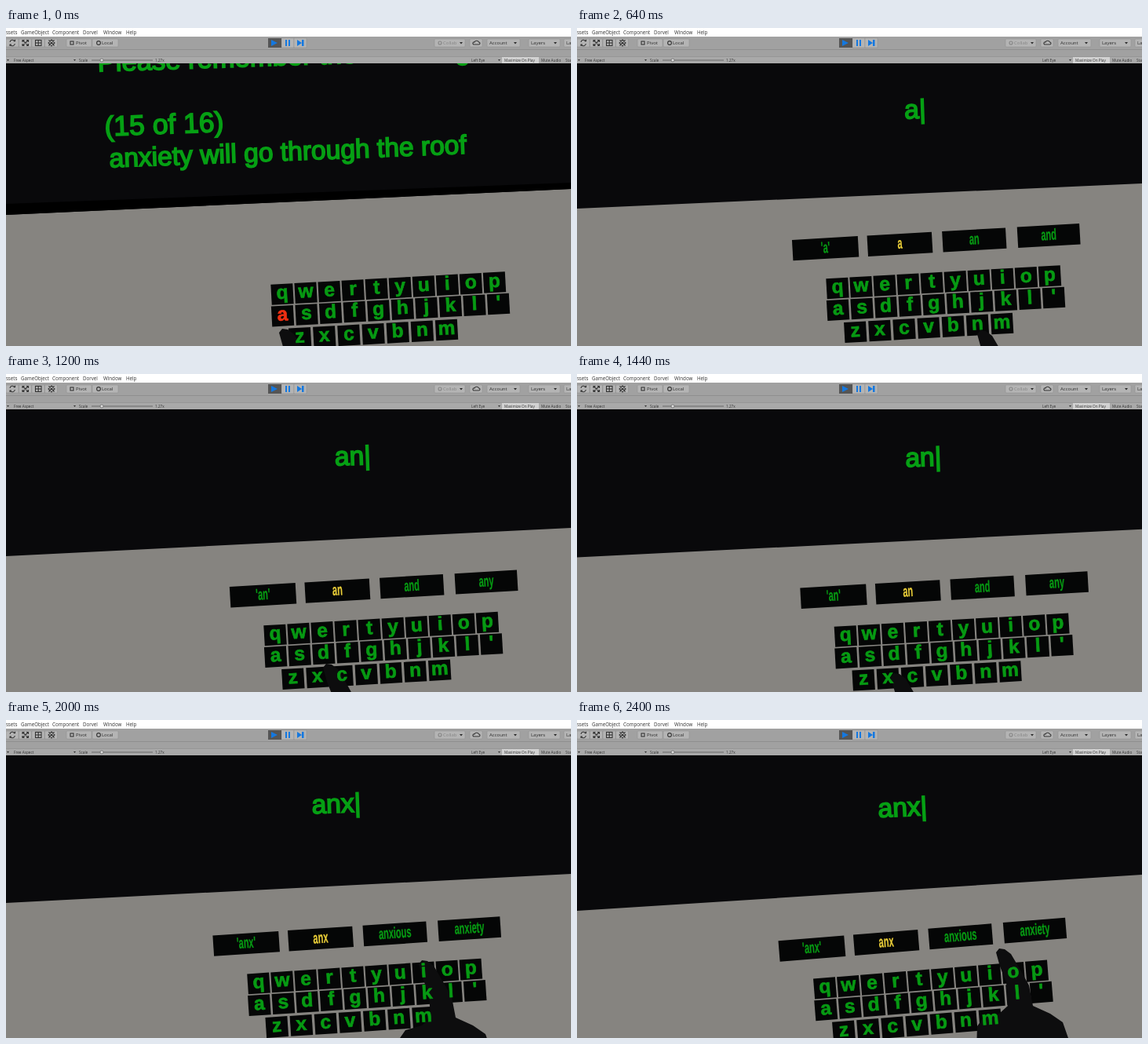
An HTML page for the animation above (2480 ms loop, 720 px wide and 405 px high).

```html
<!DOCTYPE html>
<html lang="en">
<head>
<meta charset="utf-8">
<title>Typing in VR</title>
<style>
html, body { margin: 0; width: 100%; height: 100%; overflow: hidden; background: #000; }
svg { display: block; width: 720px; height: 405px; }
text { white-space: pre; }
#prompt, #typed { font: 33.6px "Liberation Sans", Arial, sans-serif; fill: #06a014; stroke: #06a014; stroke-width: 1.7; }
#typed, .mid { text-anchor: middle; }
#letters text { font: bold 24.5px "Liberation Sans", Arial, sans-serif; fill: #079a13; stroke: #079a13; stroke-width: .7; }
#letters .down { fill: #ee2f12; stroke: #ee2f12; }
#keys rect { fill: #050606; }
#letters .hint { font-size: 20px; stroke-width: .3; }
#letters .pick { fill: #e8cc38; stroke: #e8cc38; }
#menu { font: 6.2px "Open Sans", sans-serif; fill: #333; }
#tools { font: 6px "Open Sans", sans-serif; fill: #2b2b2b; }
#strip { font: 4.7px "Open Sans", sans-serif; fill: #333; }
.btn { fill: #b4b4b4; stroke: #8c8c8c; stroke-width: .5; }
.ico { fill: none; stroke: #333; stroke-width: 1.1; }
.dim { fill: #858585; }
.blue { fill: #1478e0; }
</style>
</head>
<body>
<svg viewBox="0 0 720 405">
  <rect width="720" height="405" fill="#868480"/>
  <polygon id="wall" fill="#09090b"/>
  <polygon id="band" fill="#000"/>
  <g id="prompt">
    <text style="font-size:34.6px" transform="translate(117 55.5) rotate(-1.9)">Please remember the following</text>
    <text style="font-size:35.5px" transform="translate(126 137.500) rotate(-2.2)">(15 of 16)</text>
    <text transform="translate(132 177.500) rotate(-2.2)">anxiety will go through the roof</text>
  </g>
  <text id="typed" y="8"></text>
  <g id="keys"></g>
  <polygon id="hand" fill="#0d0d0e"/>
  <g id="letters"></g>

  <rect width="720" height="11" fill="#fff"/>
  <rect y="11" width="720" height="34" fill="#a1a1a1"/>
  <rect y="27" width="720" height="1" fill="#8f8f8f"/>
  <rect y="36" width="720" height="9" fill="#a9a9a9"/>
  <rect y="36" width="720" height=".7" fill="#8f8f8f"/>
  <g id="menu">
    <text x="-4" y="7.6">Assets</text><text x="19" y="7.6">GameObject</text>
    <text x="59" y="7.6">Component</text><text x="98" y="7.6">Dorvel</text>
    <text x="124" y="7.6">Window</text><text x="153" y="7.6">Help</text>
  </g>
  <g id="tools">
    <g class="btn">
      <rect x="0" y="14" width="16" height="10"/><rect x="16.5" y="14" width="16" height="10"/>
      <rect x="33" y="14" width="16" height="10"/><rect x="49.5" y="14" width="16" height="10"/>
      <rect x="77" y="14" width="32" height="10" rx="1"/><rect x="110" y="14" width="33" height="10" rx="1"/>
      <rect x="351" y="13" width="16" height="12"/><rect x="367" y="13" width="16" height="12"/>
      <rect x="546" y="14" width="39" height="10" rx="1"/><rect x="591" y="14" width="16" height="10" rx="1"/>
      <rect x="613" y="14" width="42" height="10" rx="1"/><rect x="666" y="14" width="40" height="10" rx="1"/>
      <rect x="711" y="14" width="20" height="10" rx="1"/>
    </g>
    <rect x="334" y="13" width="17" height="12" fill="#555"/>
    <g class="blue">
      <path d="M338 15l8 4-8 4z"/>
      <path d="M356 15h2v8h-2zM360 15h2v8h-2z"/>
      <path d="M371 15l6 4-6 4zM377 15h2.5v8H377z"/>
    </g>
    <g class="ico">
      <path d="M5 18a3.4 3.4 0 0 1 6-1.5M11.4 20a3.4 3.4 0 0 1-6 1.5M11.5 14.8v2h-2M5 23v-2h2"/>
      <path d="M21 15.5l7.5 7M28.5 15.5l-7.5 7M21 18v-2.5h2.5M26 15.5h2.5V18M21 20v2.5h2.5M26 22.5h2.5V20"/>
      <rect x="37.5" y="15.5" width="7.5" height="7"/><path d="M41.2 15.5v7M37.5 19H45"/>
      <path d="M58 15l4 4-4 4-4-4zM54.5 15.5l7 7M61.5 15.5l-7 7"/>
      <rect x="82" y="17" width="4" height="4"/><circle cx="118" cy="19" r="2.4"/>
    </g>
    <text x="89" y="21.2">Pivot</text><text x="122" y="21.2">Local</text>
    <circle class="ico" cx="553" cy="19" r="2" style="stroke:#858585"/>
    <text class="dim" x="557" y="21.2">Collab</text>
    <path class="ico" d="M596 21h6.5a1.5 1.5 0 0 0 0-3 3 3 0 0 0-5.5 0 1.5 1.5 0 0 0-1 3z"/>
    <text x="616" y="21.2">Account</text><text x="669" y="21.2">Layers</text><text x="714" y="21.2">Layout</text>
    <path d="M578 18h4l-2 2.5zM647 18h4l-2 2.5zM698 18h4l-2 2.5z"/>
  </g>
  <g id="strip">
    <rect x="632" y="37" width="47" height="8" fill="#d2d2d2"/>
    <path d="M1 40h3l-1.5 2zM86 40h3l-1.5 2zM627 40h3l-1.5 2z"/>
    <text x="10" y="42.6">Free Aspect</text><text x="93" y="42.6">Scale</text>
    <path d="M109 41h78" stroke="#666"/><circle cx="122" cy="41" r="2" fill="#ddd" stroke="#555" stroke-width=".6"/>
    <text x="190" y="42.6">1.27x</text><text x="593" y="42.6">Left Eye</text>
    <text x="635" y="42.6">Maximize On Play</text><text x="682" y="42.6">Mute Audio</text><text x="713" y="42.6">Stats</text>
  </g>
</svg>
<script>
const STEP = 80, STEPS = 31;
const $ = id => document.getElementById(id);

// time, q key x and y, p key y minus q key y, wall edge left and right, fingertip x and y
const poses = [
  [0, 351, 338.5, -15, 238, 205, 355, 384],
  [320, 336, 332, -15, 231, 199, 468, 379],
  [640, 331, 331, -15.5, 230, 198, 517, 386],
  [800, 334, 331, -15.5, 230.5, 197.5, 514, 374],
  [1200, 342, 332, -16, 232, 196, 411, 370],
  [1600, 341, 334.5, -15.5, 234.5, 199, 404, 390],
  [2000, 321, 335, -18, 233, 196, 533, 307],
  [2400, 315, 341, -22, 243, 197, 541, 292]
];

// start, typed text, suggestions
const states = [
  [0, "", []],
  [160, "a", ["'a'", "a", "an", "and"]],
  [880, "an", ["'an'", "an", "and", "any"]],
  [1760, "anx", ["'anx'", "anx", "anxious", "anxiety"]]
];
const presses = [["a", 0, 160], ["n", 800, 880], ["x", 1520, 1760]];

const handShape = [[-7, 4], [-3, -1], [4, 0], [12, 6], [25, 28], [35, 46], [40, 72], [62, 82],
  [78, 93], [85, 113], [86, 130], [-32, 130], [-31, 98], [-24, 88], [-3, 82], [8, 72], [6, 42], [-2, 22]];

// letters, first x, pitch, y
const rows = [["qwertyuiop", 1, 30.1, 0], ["asdfghjkl'", 0, 30.6, 27.7], ["zxcvbnm", 20.5, 31.2, 57]];

function add(parent, tag, attrs) {
  const el = document.createElementNS("http://www.w3.org/2000/svg", tag);
  for (const k in attrs) el.setAttribute(k, attrs[k]);
  return $(parent).appendChild(el);
}

function tile(x, y, w, h) {
  return add("keys", "rect", { x: x - w / 2, y: y - h / 2, width: w, height: h });
}

const keys = {};
for (const [chars, x0, pitch, y] of rows) {
  [...chars].forEach((c, i) => {
    const x = x0 + i * pitch;
    tile(x, y + .5, 28, 26);
    keys[c] = add("letters", "text", { x, y: y + 6.5, class: "mid" });
    keys[c].textContent = c;
  });
}

const hints = [0, 1, 2, 3].map(i => {
  const x = -11.5 + i * 95, y = -51;
  return [
    tile(x, y, 84 - i * 1.5, 26.5),
    add("letters", "text", { class: "mid hint" + (i === 1 ? " pick" : ""), transform: `translate(${x} ${y + 5.5}) scale(.55 1)` })
  ];
});

function poseAt(t) {
  let i = 0;
  while (i < poses.length - 2 && poses[i + 1][0] <= t) i++;
  const a = poses[i], b = poses[i + 1];
  const u = Math.min(1, (t - a[0]) / (b[0] - a[0]));
  return a.map((v, k) => v + (b[k] - v) * u);
}

function draw(t) {
  const [, qx, qy, rise, left, right, hx, hy] = poseAt(t);
  const [, word, list] = states.findLast(s => s[0] <= t);
  const slope = rise / 272, angle = Math.atan(slope) * 180 / Math.PI;
  const intro = !word;

  $("wall").setAttribute("points", `0,45 720,45 720,${right} 0,${left}`);
  $("band").setAttribute("points", `0,${left - 14} 720,${right - 8} 720,${right} 0,${left}`);
  $("band").style.display = $("prompt").style.display = intro ? "" : "none";
  $("prompt").setAttribute("transform", `translate(${qx - 351} ${qy - 338.5})`);

  $("typed").textContent = intro ? "" : word + "|";
  $("typed").setAttribute("transform", `translate(${qx + 100} ${qy - 218.5 + 98 * slope}) rotate(${angle * .6})`);

  const board = `translate(${qx} ${qy}) rotate(${angle})`;
  $("keys").setAttribute("transform", board);
  $("letters").setAttribute("transform", board);
  for (const [c, from, to] of presses) keys[c].classList.toggle("down", t >= from && t < to);
  hints.forEach(([box, label], i) => {
    box.style.display = intro ? "none" : "";
    label.textContent = list[i] || "";
  });
  $("hand").setAttribute("points", handShape.map(([x, y]) => `${hx + x},${hy + y}`).join(" "));
}

const start = performance.now();
function tick() {
  const n = Math.floor((performance.now() - start) / STEP) % STEPS;
  draw(n * STEP);
  requestAnimationFrame(tick);
}
tick();
</script>
</body>
</html>
```
